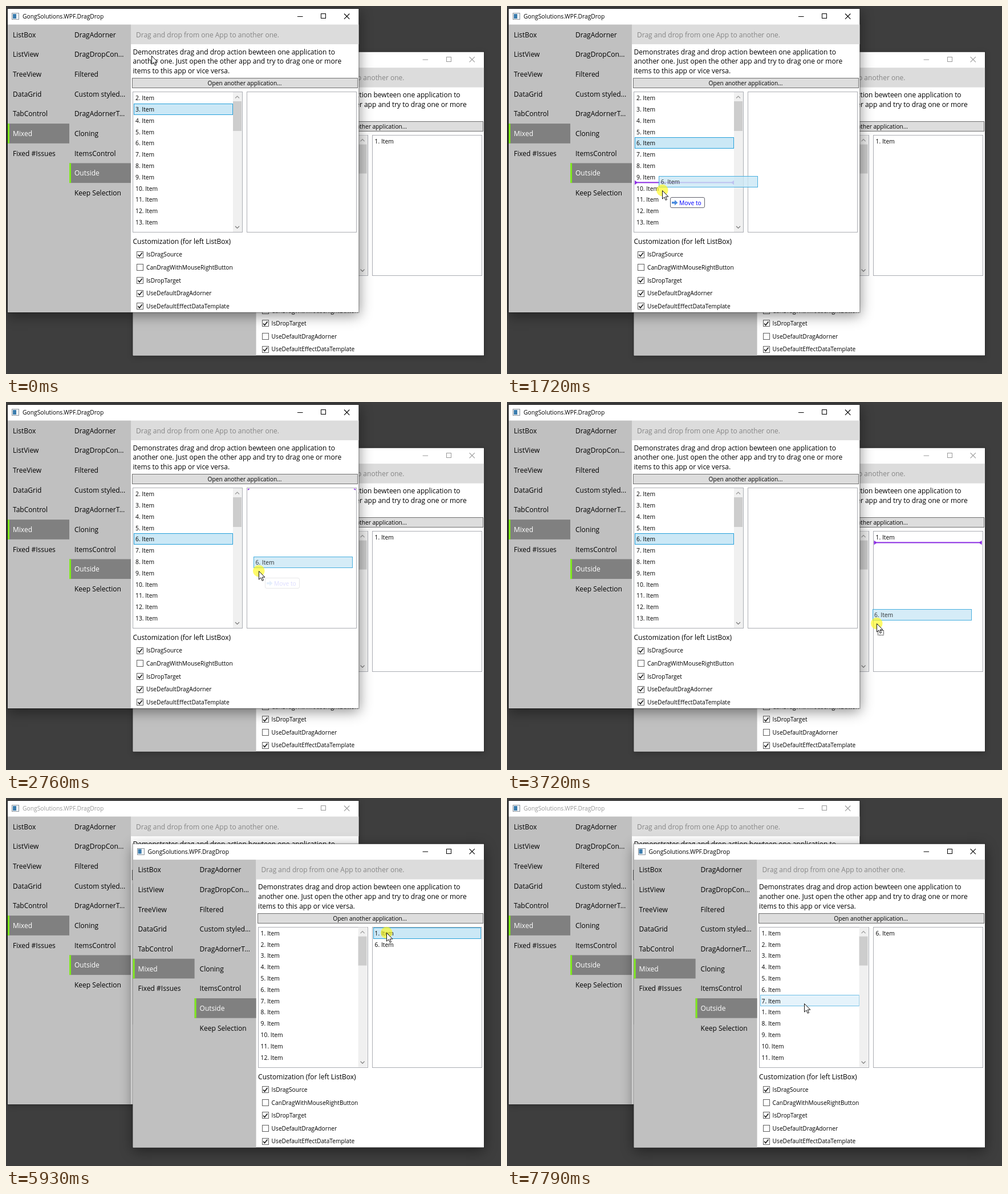
These frames come from a looping animation (868 px wide and 645 px high, 7990 ms). An HTML page with a canvas:

```html
<!DOCTYPE html>
<html lang="en">
<head>
<meta charset="utf-8">
<title>Drag and drop between two windows</title>
<style>
  html, body { margin: 0; width: 100%; height: 100%; overflow: hidden; background: #3e3e3e; }
  canvas { display: block; }
</style>
</head>
<body>
<canvas id="stage" width="868" height="645"></canvas>
<script>
const ctx = document.getElementById('stage').getContext('2d');
const LOOP = 7990, STEP = 40;
const ROW = 19.8, LIST_TOP = 151.5, LEFT_X = 222, RIGHT_X = 422;
const FIRST = { x: 0, y: 0 }, SECOND = { x: 219.6, y: 75.6 };
const TIMES = { grab: 870, drag: 1360, drop: 4770, grab2: 5930, drag2: 6140, drop2: 7790 };
const BLUE = ['#cbe8f6', '#26a0da'], PALE = ['#e5f3fb', '#70c0e7'];

// Pointer path: time, x, y
const path = [
  [0, 255, 87], [150, 255, 87], [870, 257, 231], [1109, 257, 231], [1110, 257, 236],
  [1320, 257, 236], [1720, 272, 323], [1840, 277, 327], [2120, 287, 319], [2760, 443, 296],
  [2920, 485, 304], [3720, 648, 388], [4200, 679, 407], [5130, 679, 407], [5930, 667, 236],
  [6100, 667, 236], [6740, 575, 240], [6900, 560, 240], [7500, 521, 360], [LOOP, 521, 360]
];

const clamp = v => Math.max(0, Math.min(1, v));

function slope(i, axis) {
  const a = path[i - 1], b = path[i], c = path[i + 1];
  const rests = (p, q) => p[1] === q[1] && p[2] === q[2];
  if (!a || !c || rests(a, b) || rests(b, c)) return 0;
  return (c[axis] - a[axis]) / (c[0] - a[0]);
}

function pointerAt(t) {
  const i = Math.max(0, path.findIndex(p => p[0] > t) - 1);
  const a = path[i], b = path[i + 1], span = b[0] - a[0];
  const u = Math.floor((t - a[0]) / STEP) * STEP / span;
  const along = axis => {
    const d = b[axis] - a[axis], m = slope(i, axis) * span, n = slope(i + 1, axis) * span;
    return a[axis] + u * (m + u * (3 * d - 2 * m - n + u * (m + n - 2 * d)));
  };
  return { x: along(1), y: along(2) };
}

function text(str, x, middle, size = 12, color = '#000', align = 'left') {
  ctx.font = `${size}px "Open Sans", "Noto Sans", sans-serif`;
  ctx.textAlign = align;
  ctx.fillStyle = color;
  ctx.fillText(str, x, middle + size * 0.36);
}

function fill(x, y, w, h, color) {
  ctx.fillStyle = color;
  ctx.fillRect(x, y, w, h);
}

// Bordered rectangle, snapped to whole stage pixels
function box(x, y, w, h, inside, border) {
  const { e, f } = ctx.getTransform();
  x = Math.round(x + e) - e;
  y = Math.round(y + f) - f;
  if (inside) fill(x, y, w, h, inside);
  ctx.strokeStyle = border;
  ctx.lineWidth = 1;
  ctx.strokeRect(x + 0.5, y + 0.5, w - 1, h - 1);
}

function line(color, width, ...points) {
  ctx.strokeStyle = color;
  ctx.lineWidth = width;
  ctx.beginPath();
  for (const [x, y] of points) ctx.lineTo(x, y);
  ctx.stroke();
}

function polygon(color, ...points) {
  ctx.fillStyle = color;
  ctx.beginPath();
  for (const [x, y] of points) ctx.lineTo(x, y);
  ctx.closePath();
  ctx.fill();
}

function insertion(x, y, w) {
  const c = '#8a2be2';
  fill(x, y - 1, w, 2, c);
  polygon(c, [x, y - 4], [x + 5, y], [x, y + 4]);
  polygon(c, [x + w, y - 4], [x + w - 5, y], [x + w, y + 4]);
}

function menu(x, labels, selected) {
  labels.forEach((label, i) => {
    const middle = 50.5 + i * 34.65;
    if (i === selected) {
      fill(x, middle - 17.6, 108, 34.65, '#808080');
      fill(x, middle - 17.6, 3, 34.65, '#80ec1c');
    }
    text(label, x + 9, middle, 12, i === selected ? '#fff' : '#000');
  });
}

function list(x, { items, selected, thumb, insertAt }, tip) {
  const width = thumb ? 174 : 189;
  box(x, 150, 193, 247, '#fff', '#abadb3');
  const hovered = tip && tip.x > x && tip.x < x + width + 2 ? Math.floor((tip.y - LIST_TOP) / ROW) : -1;
  items.forEach((n, i) => {
    const y = LIST_TOP + i * ROW;
    const style = n === selected ? BLUE : i === hovered ? PALE : null;
    if (style) box(x + 2, y - 0.4, width, 20, ...style);
    text(n + '. Item', x + 5, y + 10, 10.3);
  });
  if (thumb) {
    fill(x + 176, 151, 16, 245, '#f0f0f0');
    fill(x + 176, 167, 15, thumb, '#cdcdcd');
    line('#999', 1.2, [x + 180, 161.5], [x + 183.5, 158], [x + 187, 161.5]);
    line('#777', 1.2, [x + 180, 386], [x + 183.5, 389.5], [x + 187, 386]);
  }
  if (insertAt >= 0) {
    ctx.save();
    ctx.beginPath();
    ctx.rect(x + 1, 152, 191, 244);
    ctx.clip();
    insertion(x + 2, LIST_TOP + insertAt * ROW - 0.5, width);
    ctx.restore();
  }
}

function windowFrame(active) {
  ctx.save();
  ctx.shadowColor = `rgba(0, 0, 0, ${active ? 0.45 : 0.25})`;
  ctx.shadowBlur = active ? 22 : 10;
  ctx.shadowOffsetY = active ? 5 : 2;
  fill(3, 5, 615.5, 532, '#fff');
  ctx.restore();
  ctx.strokeStyle = 'rgba(0, 0, 0, 0.4)';
  ctx.lineWidth = 1;
  ctx.strokeRect(2.5, 4.5, 616.4, 532.7);
}

function appWindow(origin, { active, left, right, checks, tip }) {
  ctx.save();
  ctx.translate(origin.x, origin.y);
  const local = tip && { x: tip.x - origin.x, y: tip.y - origin.y };
  const ink = active ? '#000' : '#999';

  windowFrame(active);
  fill(3, 32.5, 216, 504.5, '#c0c0c0');
  fill(219, 32.5, 399.5, 34.5, '#dcdcdc');

  box(10, 12, 13, 12, '#f4f6f8', '#8c949c');
  fill(12, 14, 6, 8, '#3a7cae');
  text('GongSolutions.WPF.DragDrop', 29, 18.5, 10.3, ink);
  line(ink, 1, [511, 18.5], [520.5, 18.5]);
  box(552, 13, 9, 9, null, ink);
  line(ink, 1.1, [593, 13.5], [602.3, 22.8]);
  line(ink, 1.1, [602.3, 13.5], [593, 22.8]);

  menu(3, ['ListBox', 'ListView', 'TreeView', 'DataGrid', 'TabControl', 'Mixed', 'Fixed #Issues'], 5);
  menu(111, ['DragAdorner', 'DragDropCon...', 'Filtered', 'Custom styled...', 'DragAdornerT...',
    'Cloning', 'ItemsControl', 'Outside', 'Keep Selection'], 7);

  text('Drag and drop from one App to another one.', 228, 50.5, 12, '#868686');
  ['Demonstrates drag and drop action bewteen one application to',
    'another one. Just open the other app and try to drag one or more',
    'items to this app or vice versa.'].forEach((s, i) => text(s, 222.5, 80.5 + i * 16.6));

  const overButton = local && local.x > 221 && local.x < 617 && local.y > 126 && local.y < 144;
  box(221, 126, 396, 18, ...(overButton ? ['#bee6fd', '#3c7fb1'] : ['#ddd', '#707070']));
  text('Open another application...', 418.5, 135.5, 10.2, '#000', 'center');

  list(LEFT_X, left, local);
  list(RIGHT_X, right, local);

  text('Customization (for left ListBox)', 222.5, 413);
  ['IsDragSource', 'CanDragWithMouseRightButton', 'IsDropTarget', 'UseDefaultDragAdorner',
    'UseDefaultEffectDataTemplate'].forEach((label, i) => {
    const y = 435.7 + i * 22.6;
    box(229, y - 6, 12, 12, '#fff', '#606060');
    if (checks[i]) line('#212121', 1.7, [231.5, y], [234, y + 3], [238.8, y - 3.2]);
    text(label, 246, y, 10.2);
  });
  ctx.restore();
}

function adorner(x, y) {
  ctx.globalAlpha = 0.8;
  box(x, y, 174, 20, ...BLUE);
  text('6. Item', x + 3.5, y + 10, 10.3);
  ctx.globalAlpha = 1;
}

function effectTip(x, y, alpha) {
  ctx.globalAlpha = alpha;
  ctx.beginPath();
  ctx.roundRect(x + 0.5, y + 0.5, 60, 18, 2.5);
  ctx.fillStyle = '#fff';
  ctx.fill();
  ctx.strokeStyle = '#60606c';
  ctx.lineWidth = 1;
  ctx.stroke();
  const arrow = [[3, 8], [8, 8], [8, 5], [13.5, 9.7], [8, 14.4], [8, 11.5], [3, 11.5]];
  polygon('#4a8be0', ...arrow.map(([dx, dy]) => [x + dx, y + dy]));
  text('Move to', x + 16, y + 10, 10.3, '#00f');
  ctx.globalAlpha = 1;
}

function pointer({ x, y }, pressed, outside) {
  if (pressed) {
    ctx.fillStyle = 'rgba(255, 248, 20, 0.64)';
    ctx.beginPath();
    ctx.arc(x + 0.3, y, 10.3, 0, 7);
    ctx.fill();
  }
  if (outside) {
    ctx.setLineDash([1.5, 1]);
    box(x + 2, y + 12, 11, 9, '#fff', '#000');
    ctx.setLineDash([]);
  }
  const shape = [[0, 0], [0, 14.6], [3.4, 11.4], [5.7, 16.8], [8, 15.8], [5.7, 10.6], [10.4, 10.6]]
    .map(([dx, dy]) => [x + 0.5 + dx, y + 0.5 + dy]);
  polygon('#fff', ...shape);
  line('#111', 1, ...shape, shape[0]);
}

const range = (from, to) => Array.from({ length: to - from + 1 }, (_, i) => from + i);

function draw(t) {
  const tip = pointerAt(t);
  const T = TIMES;
  const moved = t >= T.drop, movedBack = t >= T.drop2, swapped = t >= T.grab2;
  const firstDrag = t >= T.drag && !moved;
  const secondDrag = t >= T.drag2 && !movedBack;
  const pressed = t >= T.grab && !moved || swapped && !movedBack;
  const hoverTip = pressed ? null : tip;

  const delayedY = pointerAt(Math.max(0, t - 80)).y;
  const insertAt = (active, x, origin, count) => {
    if (!active || tip.x < x + origin.x || tip.x > x + origin.x + 193) return -1;
    return Math.min(count, Math.max(0, Math.round((delayedY - origin.y - LIST_TOP) / ROW)));
  };

  const first = {
    active: !swapped, tip: hoverTip, checks: [1, 0, 1, 1, 1],
    left: {
      items: moved ? range(2, 14).filter(n => n !== 6) : range(2, 13),
      selected: moved ? 0 : t < T.grab ? 3 : 6,
      thumb: moved ? 53 : 52,
      insertAt: insertAt(firstDrag, LEFT_X, FIRST, 12)
    },
    right: { items: [], insertAt: insertAt(firstDrag, RIGHT_X, FIRST, 0) }
  };
  const second = {
    active: swapped, tip: hoverTip, checks: [1, 0, 1, 0, 1],
    left: {
      items: movedBack ? [...range(1, 7), 1, ...range(8, 11)] : range(1, 12),
      thumb: 51,
      insertAt: insertAt(secondDrag, LEFT_X, SECOND, 12)
    },
    right: {
      items: movedBack ? [6] : moved ? [1, 6] : [1],
      selected: swapped && !movedBack ? 1 : 0,
      insertAt: insertAt(firstDrag || secondDrag, RIGHT_X, SECOND, moved ? 2 : 1)
    }
  };

  fill(0, 0, 868, 645, '#3e3e3e');
  const stack = [[SECOND, second], [FIRST, first]];
  if (swapped) stack.reverse();
  for (const [origin, state] of stack) appWindow(origin, state);

  // Floating parts trail the pointer slightly
  const trailX = tip.x + 0.4 * (pointerAt(Math.max(0, t - STEP)).x - tip.x);
  const outside = firstDrag && tip.x > 615;
  const inGap = firstDrag ? tip.x > 415 && tip.x < 422 : tip.x > 635 && tip.x < 642;
  if (firstDrag) adorner(trailX - 5, tip.y - 25);
  pointer(tip, pressed, outside);
  if ((firstDrag || secondDrag) && !outside && !inGap) {
    const opened = firstDrag && tip.x >= 422 ? 2740 : firstDrag ? T.drag : T.drag2;
    effectTip(Math.round(trailX + 15), Math.round(tip.y + 12.4), clamp((t - opened) / 150));
  }
}

function frame() {
  draw(performance.now() % LOOP);
  requestAnimationFrame(frame);
}
frame();
</script>
</body>
</html>
```
